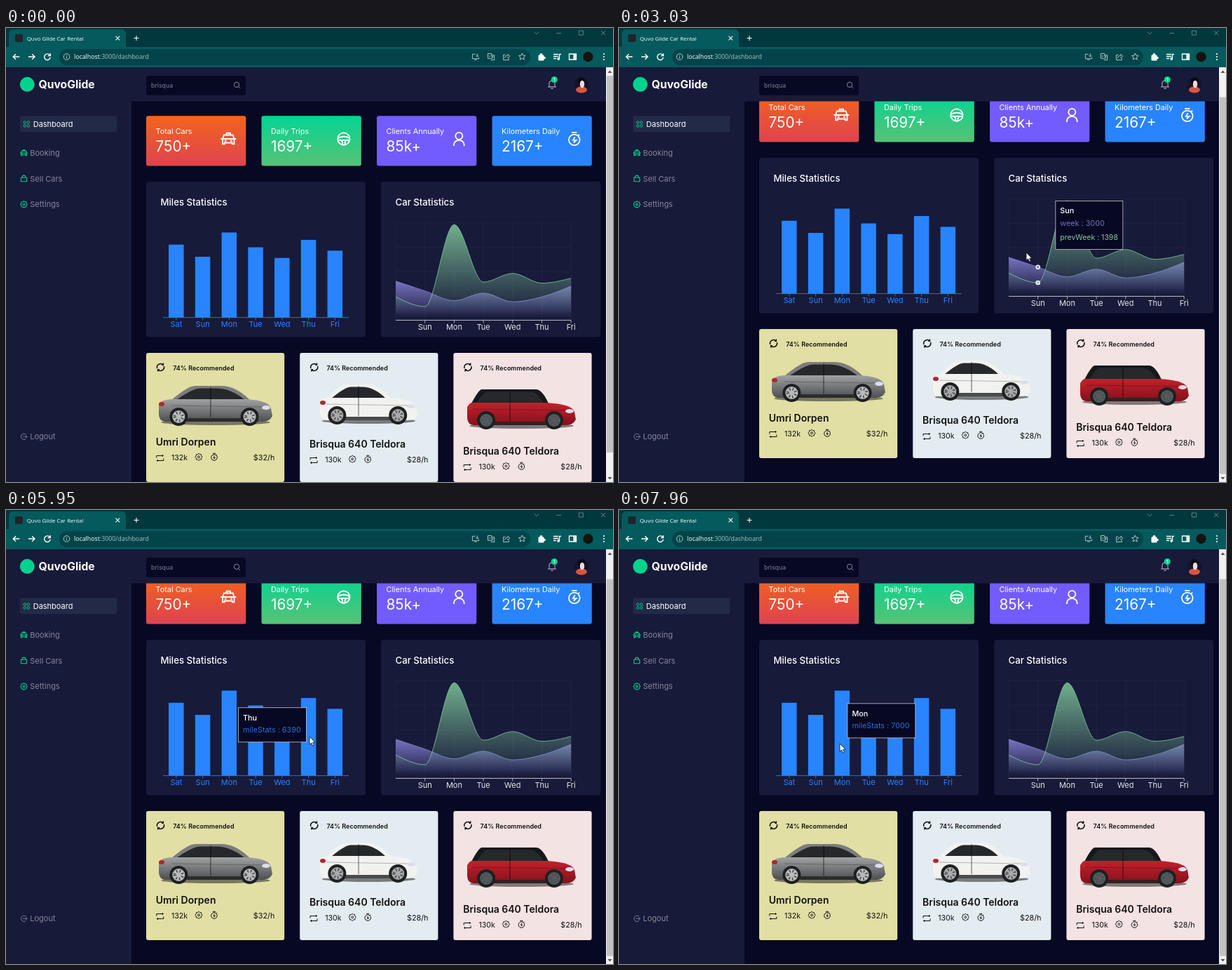
These frames come from a looping animation (866x647 px, 8 s). An HTML page:

```html
<!DOCTYPE html>
<html lang="en">
<head>
<meta charset="utf-8">
<title>Quvo Glide Car Rental</title>
<style>
html, body { margin: 0; width: 100%; height: 100%; overflow: hidden; background: #070823; }
svg { display: block; font-family: Inter, "Noto Sans", sans-serif; }
.chrome { font-family: "Open Sans", "Noto Sans", sans-serif; }
</style>
</head>
<body>
<svg id="stage" width="866" height="647" viewBox="0 0 866 647"></svg>
<script>
const PANEL = '#171a39', DARK = '#070823', BLUE = '#2884ff', GREEN = '#01d28e', INK = '#111';
const DAYS = ['Sat', 'Sun', 'Mon', 'Tue', 'Wed', 'Thu', 'Fri'];
const MILES = [6000, 5000, 7000, 5780, 4900, 6390, 5500];
const WEEK = [4000, 3000, 2000, 2780, 1890, 2390, 3490];
const PREV = [2400, 1398, 9800, 3908, 4800, 3800, 4300];

// Drawing helpers
const rect = (x, y, w, h, fill, r = 0, more = '') =>
  `<rect x="${x}" y="${y}" width="${w}" height="${h}" rx="${r}" fill="${fill}" ${more}/>`;
const circle = (x, y, r, fill, more = '') => `<circle cx="${x}" cy="${y}" r="${r}" fill="${fill}" ${more}/>`;
const ellipse = (x, y, rx, ry, fill) => `<ellipse cx="${x}" cy="${y}" rx="${rx}" ry="${ry}" fill="${fill}"/>`;
const text = (x, y, s, size, fill, weight = 400, anchor = 'start') =>
  `<text x="${x}" y="${y}" font-size="${size}" fill="${fill}" font-weight="${weight}" text-anchor="${anchor}">${s}</text>`;
const shape = (d, fill) => `<path d="${d}" fill="${fill}"/>`;
const line = (d, stroke, w = 1, more = '') => `<path d="${d}" fill="none" stroke="${stroke}" stroke-width="${w}" ${more}/>`;
const ring = (x, y, r) => `M${x - r} ${y}a${r} ${r} 0 1 0 ${2 * r} 0a${r} ${r} 0 1 0 ${-2 * r} 0`;
const star = (points, outer, inner) => 'M' + Array.from({ length: points * 2 }, (_, i) => {
  const a = i * Math.PI / points, r = i % 2 ? inner : outer;
  return `${12 + r * Math.sin(a)} ${12 - r * Math.cos(a)}`;
}).join('L') + 'z';
const icon = (name, x, y, size, color, w = 2) =>
  line(ICONS[name], color, w, `transform="translate(${x - size / 2},${y - size / 2}) scale(${size / 24})"`);
const gradient = (id, from, to, o1 = 1, o2 = 1, a = 0, b = 100) =>
  `<linearGradient id="${id}" x2="0" y2="1"><stop offset="${a}%" stop-color="${from}" stop-opacity="${o1}"/>
   <stop offset="${b}%" stop-color="${to}" stop-opacity="${o2}"/></linearGradient>`;

// Outlines on a 24-unit square
const ICONS = {
  taxi: 'M9 5V3h6v2M3 12l2-6h14l2 6v8h-3v-2H6v2H3zM0 12h24M6 15h3M15 15h3',
  wheel: ring(12, 12, 9.5) + 'M3 11q9-5 18 0M3 14h5l2 3v4M21 14h-5l-2 3v4M9 14h6',
  person: ring(12, 7.5, 5.5) + 'M4 23v-2a8 7 0 0 1 16 0v2',
  timer: ring(12, 13.5, 8.5) + 'M8 2h8M18 7l2-2M13 9l-3 5h5l-4 4',
  grid: [6.5, 17.5].map(x => ring(x, 6.5, 3.8) + ring(x, 17.5, 3.8)).join(''),
  lock: 'M3 9h18v12H3zM7 9V7a5 5 0 0 1 10 0v2',
  gear: star(8, 10.5, 8.5) + ring(12, 12, 3),
  exit: 'M19 6a9 9 0 1 0 0 12M9 12h13M18 8l4 4-4 4',
  search: ring(11, 11, 8) + 'M17 17l5 5',
  bell: 'M5 18V10a7 7 0 0 1 14 0v8M2 18h20M9 22h6',
  cycle: 'M3 15A9.500 9.500 0 0 1 18 5M21 9A9.500 9.500 0 0 1 6 19M19 1v5h-4M5 23v-5h4',
  repeat: 'M2 11V5h19M18 2l3 3-3 3M22 13v6H3M6 16l-3 3 3 3',
  back: 'M22 12H3M11 4l-8 8 8 8',
  forward: 'M2 12h19M13 4l8 8-8 8',
  reload: 'M20 8a9 9 0 1 0 1 6M21 2v7h-7',
  info: ring(12, 12, 9) + 'M12 11v6M12 7v2',
  install: 'M11 4H2v14h20v-5M8 21h8M17 2v9M13 8l4 4 4-4',
  translate: 'M2 2h11l3 15H2zM13 7h9v15H11M5 10h5M15 12h5',
  share: 'M8 6H2v16h17v-5M6 16c1-6 5-8 10-8V4l6 6-6 6v-4',
  star: star(5, 11, 5),
  list: 'M1 5h14M1 11h14M1 17h8M18 18V5h5' + ring(15.5, 18, 2.5),
  panel: 'M2 4h20v16H2zM15 4v16M18 4v16M21 4v16',
  close: 'M4 4l16 16M20 4L4 20',
  plus: 'M12 2v20M2 12h20',
  down: 'M3 8l9 9 9-9',
  min: 'M3 13h18',
  max: 'M4 4h16v16H4z'
};

// Charts, in page coordinates before scrolling
const STEP = 41.7, BAND = 37.75, BARS_X = 224, AREA_X = 556, BASE = 416.4;
const areaX = i => AREA_X + i * STEP;
const areaY = v => BASE - v * 0.0139;
const barX = i => BARS_X + BAND * (i + 0.5);

function monotone(values) {
  const y = values.map(areaY), h = STEP / 3;
  const s = y.slice(1).map((v, i) => (v - y[i]) / STEP);
  const m = y.map((_, i) => {
    const a = s[i - 1], b = s[i];
    return a * b > 0 ? 2 * Math.sign(a) * Math.min(Math.abs(a), Math.abs(b), Math.abs(a + b) / 4) : 0;
  });
  m[0] = (3 * s[0] - m[1]) / 2;
  m[6] = (3 * s[5] - m[5]) / 2;
  return `M${areaX(0)} ${y[0]}` + s.map((_, i) =>
    `C${areaX(i) + h} ${y[i] + m[i] * h} ${areaX(i + 1) - h} ${y[i + 1] - m[i + 1] * h} ${areaX(i + 1)} ${y[i + 1]}`).join('');
}

function area(values, color, fill) {
  const d = monotone(values);
  return shape(`${d}V${BASE}H${AREA_X}Z`, `url(#${fill})`) + line(d, color, 0.8);
}

function charts() {
  const axis = '#d0d1d8', grid = '#242847';
  let s = '', bars = '', labels = '';
  [[200, 'Miles Statistics'], [535, 'Car Statistics']].forEach(([x, title]) =>
    s += rect(x, 219, 313, 221.5, PANEL, 4) + text(x + 20.5, 253, title, 13.2, '#fff', 500));
  DAYS.forEach((day, i) => {
    const h = MILES[i] * 0.0173, x = areaX(i);
    bars += rect(barX(i) - 10.8, 412.5 - h, 21.5, h, BLUE) + line(`M${barX(i)} 412.500v4`, BLUE, 0.8) +
      text(barX(i), 426, day, 11, BLUE, 400, 'middle');
    s += line(`M${x} ${BASE}v-139`, grid, 0.7);
    if (i < 5) s += line(`M${AREA_X} ${BASE - i * 34.7}h250`, grid, 0.7);
    if (i) labels += line(`M${x} ${BASE}v4`, axis, 0.8) + text(x, 430, day, 11, '#e6e6ec', 400, 'middle');
  });
  return s + bars + line('M224 412.600h265', BLUE, 0.8) + area(WEEK, '#8884d8', 'week') + area(PREV, '#82ca9d', 'prev') +
    line(`M${AREA_X} ${BASE}h250`, axis, 0.9) + labels;
}

const tiles = () => [
  ['url(#orange)', 'Total Cars', '750+', 'taxi'],
  ['url(#green)', 'Daily Trips', '1697+', 'wheel'],
  ['#725cff', 'Clients Annually', '85k+', 'person'],
  [BLUE, 'Kilometers Daily', '2167+', 'timer']
].map(([fill, label, value, name], i) => {
  const x = 200 + i * 164.5;
  return rect(x, 125.3, 142.3, 71.2, fill, 3) + text(x + 13.5, 150.5, label, 10.9, '#fff') +
    text(x + 13.5, 176, value, 20.8, '#fff') + icon(name, x + 117.3, 158, 22, '#fff');
}).join('');

// A side view: cabin between c0 and c1, its roof drawn in by `lean`, over a body of width w
function car({ x, w, top, c0, c1, lean, paint, roof, rim }) {
  const belt = top + 20, sill = top + 51, end = x + w;
  const cabin = (inset, rise) => `M${c0 + inset} ${belt}Q${c0 + lean * 0.7 + inset} ${top + rise} ${c0 + lean + inset} ${top + rise}` +
    `H${c1 - lean * 1.2 - inset}Q${c1 - lean * 0.6 - inset} ${top + rise} ${c1 - inset} ${belt}Z`;
  const tyre = cx => circle(cx, sill - 7, 13, '#1e2022') + circle(cx, sill - 7, 9, rim) +
    line(ring(cx, sill - 7, 5.5), '#4a4d50', 4, 'stroke-dasharray="1.500 3"');
  return ellipse(x + w / 2, sill + 1, w * 0.48, 4, '#3339') + shape(cabin(0, 0), roof) + shape(cabin(7, 3.5), '#26282b') +
    shape(`M${x} ${belt + 7}Q${x + 2} ${belt} ${c0} ${belt - 1}H${c1 - 4}Q${end - 5} ${belt + 1} ${end - 2} ${belt + 12}` +
      `L${end} ${sill - 8}Q${end - 4} ${sill} ${end - 14} ${sill}H${x + 10}Q${x} ${sill} ${x} ${sill - 12}Z`, paint) +
    rect(x + w * 0.25, sill - 5, w * 0.48, 5, '#222c') + line(`M${c0} ${belt + 8}L${end - 12} ${belt + 10}`, '#0005', 0.8) +
    line(`M${(c0 + c1) / 2} ${top + 2}V${sill - 6}`, '#0008', 1.2) + ellipse(x + 4, belt + 6, 4, 3, '#b3262a') +
    ellipse(end - 9, belt + 11, 6, 3, '#dde') + tyre(x + w * 0.175) + tyre(x + w * 0.8);
}

const cards = () => [
  ['#e1dfa4', 'Umri Dorpen', 594.5, '132k', '$32/h',
    { x: 218, w: 162, top: 510, c0: 236, c1: 348, lean: 34, paint: 'url(#silver)', roof: '#7c7d7c', rim: '#bbb' }],
  ['#e3ecf1', 'Brisqua 640 Teldora', 597.5, '130k', '$28/h',
    { x: 448, w: 139, top: 508, c0: 457, c1: 549, lean: 28, paint: '#f2f2f1', roof: '#f2f2f1', rim: '#aaa' }],
  ['#f4e3e3', 'Brisqua 640 Teldora', 607.5, '130k', '$28/h',
    { x: 658, w: 155, top: 515, c0: 664, c1: 774, lean: 15, paint: 'url(#red)', roof: '#17181b', rim: '#555a5e' }]
].map(([fill, name, y, count, price, look], i) => {
  const x = 200 + i * 219.2;
  return rect(x, 463, 197.2, 184, fill, 3) + icon('cycle', x + 20.5, 483.5, 13, INK, 2.8) +
    text(x + 38.2, 487.8, '74% Recommended', 9, INK, 600) + car(look) + text(x + 13.8, y, name, 14, INK, 600) +
    icon('repeat', x + 19.8, y + 18.5, 12, INK) + text(x + 36, y + 21.7, count, 10.6, INK) +
    icon('gear', x + 75, y + 16.8, 11.5, INK) + icon('timer', x + 97, y + 16.8, 12, INK) +
    text(x + 183.3, y + 21.7, price, 10.8, INK, 400, 'end');
}).join('');

function sidebar() {
  const grey = '#85879a';
  return rect(0, 56, 179, 591, PANEL) + circle(30.3, 80.3, 10.5, GREEN) + text(46.5, 86, 'QuvoGlide', 15.7, '#fff', 700) +
    rect(20, 125.3, 138.5, 23, '#232a47', 3) + icon('grid', 29.3, 137, 11, GREEN) + text(38.7, 141, 'Dashboard', 11, '#fff') +
    [['Booking', 'taxi'], ['Sell Cars', 'lock'], ['Settings', 'gear']].map(([s, name], i) =>
      icon(name, 25.5, 178 + i * 36.7, 11, GREEN, 2.3) + text(34.3, 182 + i * 36.7, s, 11, grey)).join('') +
    icon('exit', 25.5, 582.3, 11, grey) + text(34.3, 586.3, 'Logout', 11, grey);
}

const header = () => rect(179, 56, 677, 48.5, PANEL) + rect(200, 68, 142, 27.7, DARK, 3) +
  text(207, 85, 'brisqua', 8.8, '#7e8094') + icon('search', 329.5, 81.3, 11, '#9698a8') + icon('bell', 779, 80.3, 14, '#a3a5b3') +
  circle(782.3, 73.6, 4.6, GREEN) + text(782.3, 76, '1', 6.5, '#fff', 500, 'middle') +
  circle(821, 81, 10.5, '#121430') + ellipse(821, 88, 8, 4.5, '#d8543f') + circle(821, 75.5, 5.3, '#0b0b12') +
  ellipse(822, 80, 3.2, 5.2, '#f6ddd2');

function browser() {
  const dim = '#7d9c9e', soft = '#b9d2d2', teal = '#045a5d';
  const row = (names, x, step, y, size, color, w) => names.map((n, i) => icon(n, x + i * step, y, size, color, w)).join('');
  return `<g class="chrome">` + rect(0, 0, 866, 28, '#00383d') + rect(0, 27, 866, 29, teal) + rect(4, 2, 167, 40, teal, 6) +
    rect(13, 9, 11, 11, '#20232a', 2) + text(29.7, 17.5, 'Quvo Glide Car Rental', 7.9, '#fff') +
    row(['close', 'plus'], 159.3, 26.7, 14.5, 8.5, '#fff', 3) + row(['down', 'min', 'max', 'close'], 757, 31.7, 7, 9, dim) +
    rect(76, 30, 672, 23, '#02444a', 11.5) + row(['back', 'forward', 'reload'], 14.5, 22.2, 41, 11.5, '#fff', 3) +
    icon('info', 86.5, 41, 11.5, soft) + text(97, 44.3, '<tspan fill="#fff">localhost</tspan>:3000/dashboard', 8.8, '#a5c3c4') +
    row(['install', 'translate', 'share', 'star'], 670, 22.1, 41, 11, soft) +
    rect(759.5, 38.5, 8, 8, '#fff', 1) + circle(763.5, 38, 2, '#fff') + circle(768, 42.5, 1.8, '#fff') +
    row(['list', 'panel'], 786.5, 22, 41, 12, '#fff', 2.6) + circle(830.5, 41, 7.2, '#15120f') +
    [37, 41, 45].map(y => circle(853, y, 1.1, '#fff')).join('') + '</g>';
}

const $ = id => document.getElementById(id);
$('stage').innerHTML = `<defs>
  ${gradient('orange', '#f2641c', '#df4350')}${gradient('green', '#02d592', '#58c276')}
  ${gradient('silver', '#a0a1a2', '#4c4e51')}${gradient('red', '#c4202c', '#83111b')}
  ${gradient('week', '#8884d8', '#8884d8', 0.8, 0, 5, 95)}${gradient('prev', '#82ca9d', '#82ca9d', 0.8, 0, 5, 95)}</defs>
  ${rect(0, 0, 866, 647, DARK)}
  <g id="page">${tiles()}${charts()}${cards()}<g id="dots"></g></g>
  <g id="tip"></g>${header()}${sidebar()}${browser()}
  ${rect(856, 56, 10, 591, '#f1f1f1')}<g id="thumb">${rect(857, 68, 9, 537, '#c1c1c1')}</g>
  ${shape('M858.500 64l3-3.500 3 3.500zM858.500 640l3 3.500 3-3.500z', '#505050')}
  <g id="cursor"><path d="M0 0V11.200L2.600 8.900 4.500 13 6.400 12.100 4.600 8.200H8Z" fill="#fff" stroke="#111" stroke-width=".8"/></g>`;

// Stops of the pointer: [time, x, y]
const MOUSE = [
  [710, 809, 573], [960, 622, 300], [1120, 697, 164], [1460, 697, 164], [1950, 491, 118], [2360, 491, 118],
  [2700, 630, 265], [2820, 635, 305], [3030, 581, 320], [3110, 581, 320], [3850, 606, 345], [4100, 655, 357],
  [4210, 655, 357], [4830, 507, 352], [5400, 470, 341], [5720, 451, 324], [5900, 433, 323], [6020, 433, 323],
  [6400, 400, 332], [6900, 389, 326], [7180, 362, 330], [7400, 362, 330], [7960, 315, 333]
];
const SCROLLED = 34;

function mouse(t) {
  const i = MOUSE.findIndex(k => k[0] > t);
  if (i < 1) return (i ? MOUSE[MOUSE.length - 1] : MOUSE[0]).slice(1);
  const a = MOUSE[i - 1], b = MOUSE[i], p = (t - a[0]) / (b[0] - a[0]);
  return [1, 2].map(n => a[n] + (b[n] - a[n]) * p);
}

// The day under the pointer and where its tooltip wants to be; it flips at the chart's edges
function hover(t) {
  const [x, y] = mouse(t), gap = 7;
  if (t < 2360 || y < 277 - SCROLLED) return null;
  const isArea = x >= AREA_X;
  if (!isArea && x > BARS_X + 7 * BAND) return null;
  const day = isArea ? Math.round((x - AREA_X) / STEP) : Math.floor((x - BARS_X) / BAND);
  const w = !isArea ? 98 : day === 1 ? 97 : 103, h = isArea ? 70 : 50;
  const at = isArea ? areaX(day) : barX(day), right = isArea ? areaX(6) : 489, bottom = isArea ? 382 : 380;
  return {
    isArea, day, w, h,
    x: at + gap + w > right ? at - gap - w : at + gap,
    y: y + gap + h > bottom ? y - gap - h : y + gap
  };
}

// The tooltip glides: its place is the mean of the wanted places over the last quarter second
function glide(t, now) {
  let x = 0, y = 0, n = 0;
  for (let ago = 0; ago <= 250; ago += 10) {
    const h = hover(t - ago);
    if (!h || h.isArea !== now.isArea) break;
    x += h.x; y += h.y; n++;
  }
  return [x / n, y / n];
}

const tooltip = ({ isArea, day, w, h }) =>
  rect(0.5, 0.5, w - 1, h - 1, DARK, 0, 'stroke="#c6c7cd" stroke-width=".8"') + text(7, 18.3, DAYS[day], 10.8, '#fff', 500) +
  (isArea
    ? text(7, 36, `week : ${WEEK[day]}`, 10.8, '#7572bb') + text(7, 55.5, `prevWeek : ${PREV[day]}`, 10.5, '#82ca9d')
    : text(7, 36, `mileStats : ${MILES[day]}`, 10.8, '#2671d8'));

const dots = day => [[WEEK, '#8884d8'], [PREV, '#82ca9d']].map(([v, color]) =>
  circle(areaX(day), areaY(v[day]), 2.6, color, 'stroke="#fff" stroke-width="1.4"')).join('');

const move = (id, x, y) => $(id).setAttribute('transform', `translate(${x},${y})`);

function draw() {
  const t = performance.now() % 8000, now = hover(t);
  const scroll = t < 2090 ? 0 : t < 2160 ? 13 : t < 2220 ? 26.3 : SCROLLED;
  move('page', 0, -scroll);
  move('thumb', 0, scroll * 0.9);
  move('cursor', ...mouse(t));
  $('cursor').style.display = t < 710 ? 'none' : '';
  $('tip').innerHTML = now ? tooltip(now) : '';
  $('dots').innerHTML = now && now.isArea ? dots(now.day) : '';
  if (now) move('tip', ...glide(t, now));
  requestAnimationFrame(draw);
}
draw();
</script>
</body>
</html>
```
